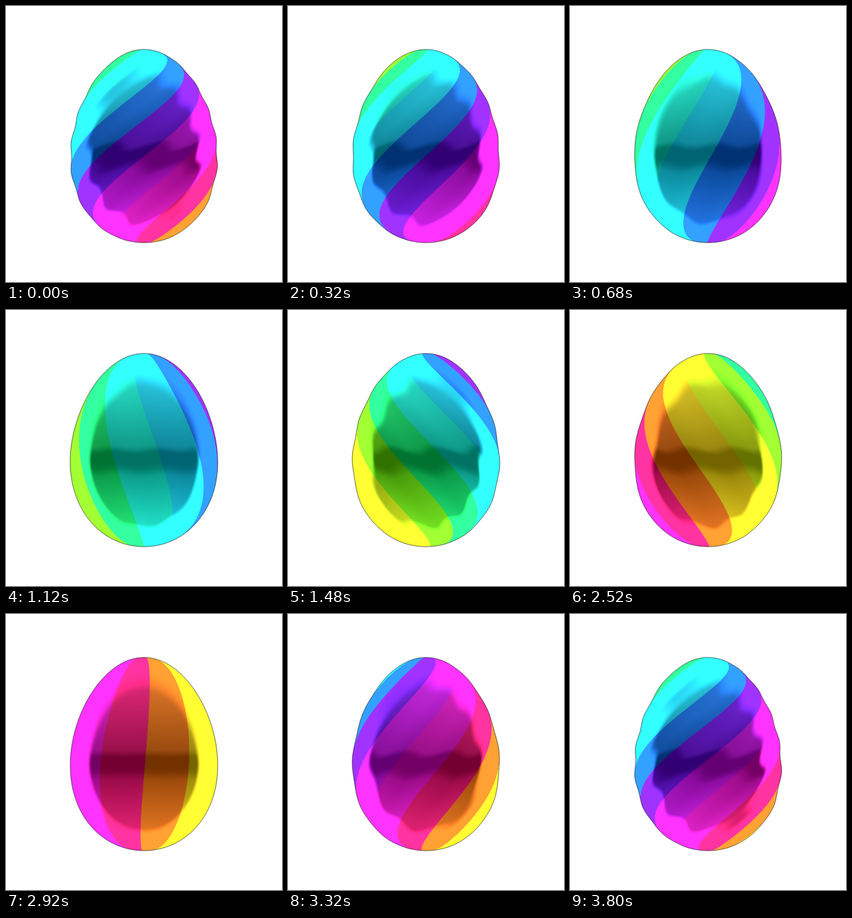
Write an HTML page with a canvas that moves like this. It is 400 by 400 pixels and loops after 3840 ms.

```html
<!DOCTYPE html>
<html lang="en">
<head>
<meta charset="utf-8">
<title>Twisting egg</title>
<style>
  html, body { margin: 0; width: 100%; height: 100%; overflow: hidden; background: #fff; }
  canvas { display: block; width: 400px; height: 400px; }
</style>
</head>
<body>
<canvas id="stage" width="400" height="400"></canvas>
<script>
const LOOP = 3840, STEP = 40;
const CX = 200, CY = 203, RX = 107, RY = 140;
const TAPER = 0.12;     // how much narrower the top is
const EYE = 4.7;        // camera distance in egg radii
const PIVOT = 0.12;     // height that the twist turns around
const X0 = 90, Y0 = 60, W = 220, H = 286;

const ctx = document.getElementById('stage').getContext('2d');
const image = ctx.createImageData(W, H);

const clamp = v => Math.max(0, Math.min(1, v));
const smooth = (a, b, v) => { const t = clamp((v - a) / (b - a)); return t * t * (3 - 2 * t); };
const mix = (a, b, t) => a + (b - a) * t;

// Twelve bands around the colour wheel, two between each pair of neighbouring hues.
const LOW = 0.43, HIGH = 0.87;
const bands = [
  [1, LOW, 0], [1, HIGH, 0], [HIGH, 1, 0], [LOW, 1, 0],
  [0, 1, LOW], [0, 1, HIGH], [0, HIGH, 1], [0, LOW, 1],
  [LOW, 0, 1], [HIGH, 0, 1], [1, 0, HIGH], [1, 0, LOW]
];

// Width of the egg at height v against a plain ellipse.
const girth = v => RX * (1 + TAPER * v) / (1 + TAPER * TAPER / 2);

// Band offset and twist offset where the view ray through (u, v) meets the unit sphere.
function hit(u, v) {
  const r2 = Math.min(1, u * u + v * v), k = 1 / Math.sqrt(EYE * EYE - 1);
  const t = (EYE - Math.sqrt(1 - r2)) / (1 + r2 * k * k);
  const d = v * k * t - PIVOT;
  return {
    turn: Math.atan2(u * k * t, EYE - t) * 6 / Math.PI,
    lift: 3.15 * d - 0.35 * d * d
  };
}

const dots = [];
for (let j = 0; j < H; j++) {
  const y = Y0 + j + 0.5, v = (y - CY) / RY;
  for (let i = 0; i < W; i++) {
    const x = X0 + i + 0.5 - CX, u = x / girth(v);
    if (u * u + v * v < 1.04) dots.push({ at: (j * W + i) * 4, x, y, ...hit(u, v) });
  }
}

// Points down the right side and back up the left.
const rim = [];
for (let i = 0; i < 240; i++) {
  const a = i * Math.PI / 120, u = Math.sin(a), v = -Math.cos(a);
  rim.push({ x: u * girth(v), y: CY + v * RY, ...hit(u, v) });
}

// Returns the gain on the band colour and the white glare added to it.
function light(x, y) {
  const dy = y - 215, high = clamp(-dy / 130);
  const edge = smooth(mix(0.95, 0.72, high), 1.04, Math.hypot(x / 80, dy / (dy < 0 ? 130 : 100)));
  let gain, glare;
  if (y < 222) {
    const down = clamp((y - 90) / 110), dark = smooth(196, 209, y);
    gain = mix(mix(0.72, 0.54, down), 0.45, dark);
    glare = mix(mix(0.17, 0.06, down), 0, dark);
  } else {
    const up = smooth(222, 243, y), low = clamp((y - 235) / 75);
    gain = mix(0.45, mix(0.56, 0.74, low), up);
    glare = mix(0, mix(0.04, 0.13, low), up);
  }
  return [mix(gain, 1, edge), mix(glare, 0.2, edge)];
}

// The twisted bands are nearly flat, so the silhouette sinks between their edges.
function outline(spin, twist) {
  ctx.beginPath();
  for (const p of rim) {
    const dent = Math.sin(Math.PI * (spin + p.turn + twist * p.lift)) ** 2;
    ctx.lineTo(CX + p.x * (1 - 0.02 * Math.abs(twist) * dent), p.y);
  }
  ctx.closePath();
  ctx.globalCompositeOperation = 'destination-in';
  ctx.fill();
  ctx.globalCompositeOperation = 'source-over';
  ctx.lineWidth = 0.8;
  ctx.strokeStyle = 'rgba(0,0,0,.7)';
  ctx.stroke();
}

function draw(time) {
  const twist = Math.cos(2 * Math.PI * time / LOOP);
  const spin = 9.1 + 24 - time / 320;
  const px = image.data, soft = 0.025;
  for (const p of dots) {
    const pos = spin + p.turn + twist * p.lift;
    const n = Math.floor(pos), f = pos - n, wave = 2 * Math.PI * f;
    const [gain, glare] = light(
      p.x + 4 * twist * Math.sin(wave),
      p.y + 6 * Math.abs(twist) * Math.cos(wave)
    );
    const a = bands[n % 12], b = bands[(n + 1) % 12];
    const blend = clamp((f - 1 + soft) / soft);
    for (let c = 0; c < 3; c++)
      px[p.at + c] = 255 * (mix(a[c], b[c], blend) * gain + glare);
    px[p.at + 3] = 255;
  }
  ctx.clearRect(0, 0, 400, 400);
  ctx.putImageData(image, X0, Y0);
  outline(spin, twist);
}

const start = performance.now();
let last = -1;
function tick() {
  const time = Math.floor((performance.now() - start) % LOOP / STEP) * STEP;
  if (time !== last) draw(last = time);
  requestAnimationFrame(tick);
}
tick();
</script>
</body>
</html>
```
